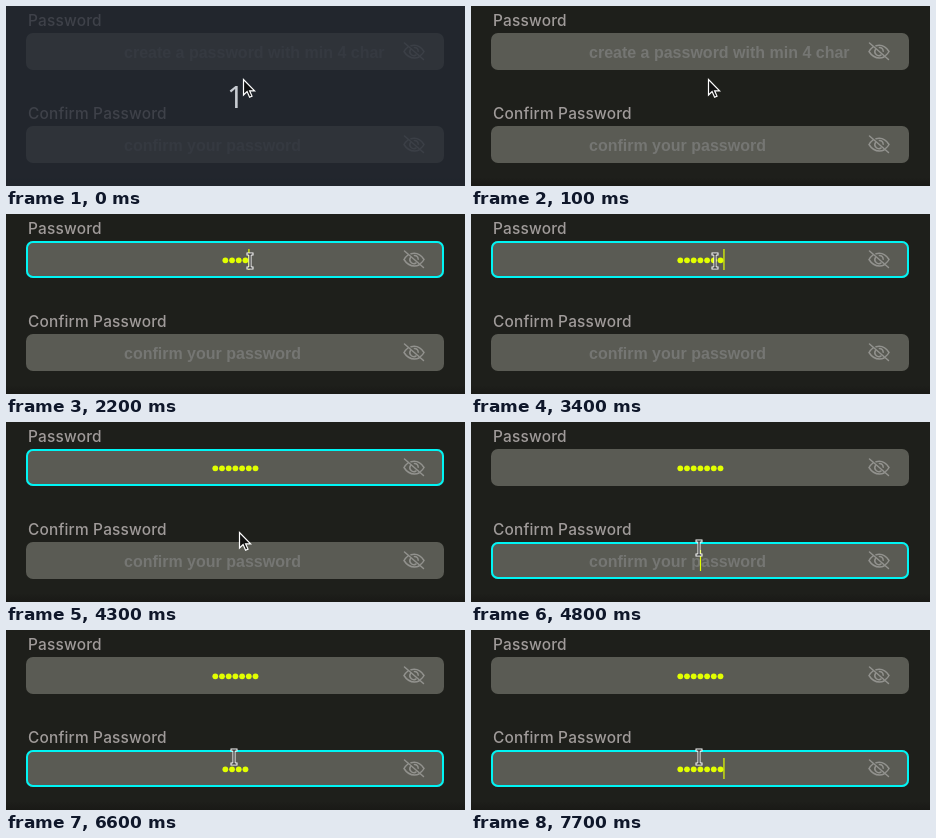
Recreate the animation shown at these times as an HTML page. Size 459 px wide and 180 px high, loop 8 s.

```html
<!DOCTYPE html>
<html lang="en">
<head>
<meta charset="utf-8">
<title>Password form</title>
<style>
  html, body { margin: 0; width: 100%; height: 100%; overflow: hidden; background: #1e1f1b; }
  svg { display: block; width: 459px; height: 180px; }
  .label { font: 500 15.4px Inter, "Open Sans", sans-serif; letter-spacing: .2px; fill: #a09b9a; }
  .hint { font: bold 16px "Liberation Sans", Arial, sans-serif; fill: #757673; }
  .count { font: 30px "Noto Sans", "Open Sans", sans-serif; fill: #c8ccd2; text-anchor: middle; }
  .eye { fill: none; stroke: #92928e; stroke-width: 1.5; stroke-linecap: round; }
  .ring { fill: none; stroke: #00f5f5; stroke-width: 2; }
  .dots, .caret { fill: #e2ff00; }
</style>
</head>
<body>
<svg viewBox="0 0 459 180">
  <defs>
    <linearGradient id="fade" x2="0" y2="1">
      <stop stop-color="#161613" stop-opacity="0"/>
      <stop offset="1" stop-color="#161613" stop-opacity=".6"/>
    </linearGradient>
    <g id="eye" class="eye">
      <path d="M398.5 37L417.5 53.5M405 39.7Q413 37.6 418 45.5Q416.8 47.6 414.8 49.3M402 41Q399.5 42.8 398 45.5Q402 52 408.5 52Q411 52 413 51"/>
      <path d="M404.4 43.6a4 4 0 0 0 5.6 5.4M408.4 41.5a4 4 0 0 1 3.8 3.8"/>
    </g>
  </defs>
  <rect width="459" height="180" fill="#1e1f1b"/>
  <rect y="171" width="459" height="9" fill="url(#fade)"/>
  <g id="form"></g>
  <g id="overlay">
    <rect width="459" height="180" fill="#232833" fill-opacity=".78"/>
    <text class="count" x="229.5" y="102">1</text>
  </g>
  <path id="arrow" d="M.5 .5v15.5l3.6-3.4 2.5 5.6 2.4-1.1-2.4-5.3h5z" fill="#111" stroke="#fff" stroke-width="1.2"/>
  <g id="beam" fill="none">
    <path d="M-3.5-7h7M-3.5 7h7M0-7v14" stroke="#fff" stroke-width="3"/>
    <path d="M-2.5-7h5M-2.5 7h5M0-7v14" stroke="#111" stroke-width="1.1"/>
  </g>
</svg>
<script>
const $ = id => document.getElementById(id);
const LOOP = 8000, BLINK = 600, MID = 229.4, PITCH = 6.7;

// keys: [time, number of dots]
const fields = [
  { y: 0, label: "Password", hint: "create a password with min 4 char", focus: 700, blur: 4800,
    keys: [[700, 0], [1700, 1], [1900, 2], [2200, 4], [2800, 5], [3200, 6], [3400, 7]] },
  { y: 93, label: "Confirm Password", hint: "confirm your password", focus: 4800, blur: LOOP,
    keys: [[4800, 0], [5600, 1], [5700, 2], [5900, 3], [6000, 4], [6900, 5], [7200, 6], [7700, 7]] }
];

// [time, shape, x, y]
const pointer = [
  [0, "arrow", 237, 73], [400, "arrow", 233, 67], [500, "beam", 229, 56],
  [1000, "beam", 241, 47], [1300, "beam", 244, 47],
  [4000, "beam", 245, 54], [4100, "arrow", 245, 68], [4200, "arrow", 240, 90],
  [4300, "arrow", 233, 110], [4400, "beam", 229, 128], [4600, "beam", 228, 126],
  [5000, "beam", 228, 127]
];

const latest = (list, t) => list.findLast(item => item[0] <= t);
const show = (el, on) => el.setAttribute("visibility", on ? "visible" : "hidden");

for (const f of fields) {
  const g = document.createElementNS("http://www.w3.org/2000/svg", "g");
  g.setAttribute("transform", `translate(0 ${f.y})`);
  g.innerHTML = `<text class="label" x="22" y="20">${f.label}</text>
    <rect x="20" y="27" width="418" height="37" rx="7" fill="#5a5b54"/>
    <rect class="ring" x="21" y="28" width="416" height="35" rx="6"/>
    <text class="hint" x="118" y="52">${f.hint}</text>
    <use href="#eye"/><g class="dots"></g>
    <rect class="caret" y="35" width="1.2" height="21"/>`;
  $("form").append(g);
  for (const part of ["ring", "hint", "dots", "caret"]) f[part + "El"] = g.querySelector("." + part);
}

function drawField(f, t) {
  const [since, count] = latest(f.keys, t) || [0, 0];
  const focused = t >= f.focus && t < f.blur;
  show(f.ringEl, focused);
  f.ringEl.setAttribute("opacity", f.focus === 700 && t < 800 ? .5 : 1);
  show(f.hintEl, !count);
  show(f.caretEl, focused && Math.floor((t - since) / BLINK) % 2 === 0);
  f.caretEl.setAttribute("x", MID + count * PITCH / 2 - .5);
  if (f.count !== count) {
    f.count = count;
    f.dotsEl.innerHTML = Array.from({ length: count }, (_, i) =>
      `<circle cx="${MID + (i - (count - 1) / 2) * PITCH}" cy="46.3" r="2.9"/>`).join("");
  }
}

function draw() {
  const t = performance.now() % LOOP;
  fields.forEach(f => drawField(f, t));
  show($("overlay"), t < 100);
  const [, shape, x, y] = latest(pointer, t);
  for (const id of ["arrow", "beam"]) show($(id), id === shape);
  $(shape).setAttribute("transform", `translate(${x} ${y})`);
  requestAnimationFrame(draw);
}
draw();
</script>
</body>
</html>
```
